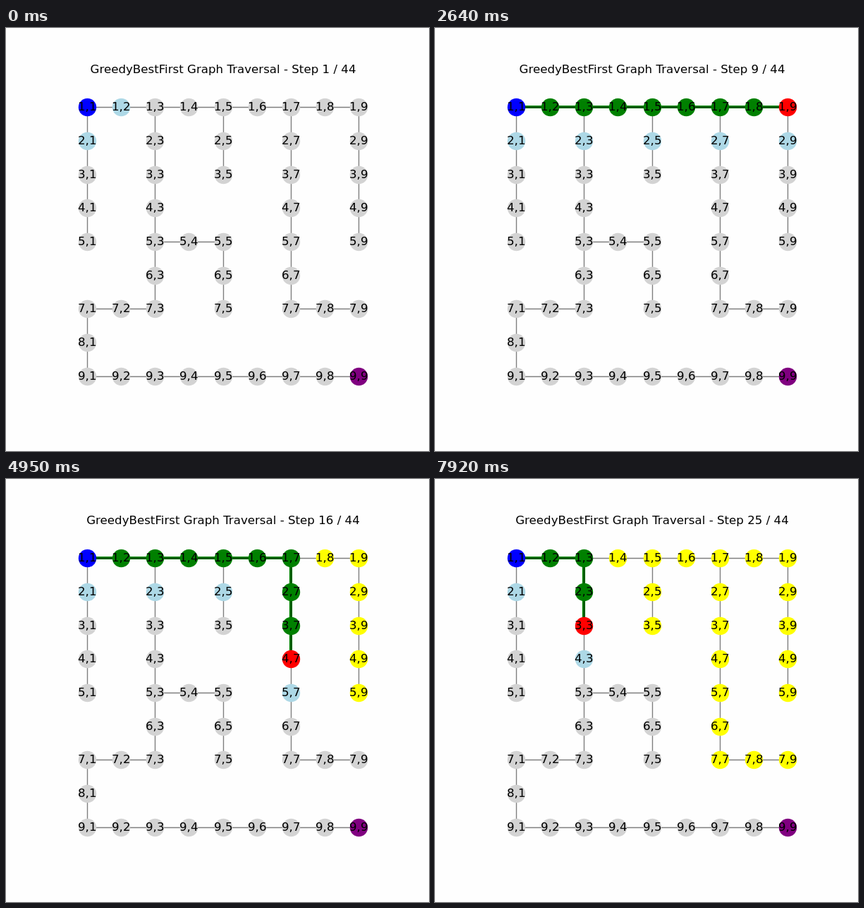
An HTML page for the animation above (8000 ms loop, 600 by 600 pixels).

```html
<!DOCTYPE html>
<html lang="en">
<head>
<meta charset="utf-8">
<title>Graph Traversal</title>
<style>
  html, body { margin: 0; width: 100%; height: 100%; overflow: hidden; background: #fefefe; }
  svg { display: block; width: 600px; height: 600px; }
  text { font: 16.667px "DejaVu Sans", sans-serif; fill: #000; }
  .edge { stroke: #000; stroke-opacity: .5; stroke-width: 1.39; }
  .trail { stroke: green; stroke-width: 4.17; visibility: hidden; }
  #title { text-anchor: middle; }
</style>
</head>
<body>
<svg viewBox="0 0 600 600">
  <g id="trails"></g>
  <g id="edges"></g>
  <g id="nodes"></g>
  <g id="labels"></g>
  <text id="title" x="308" y="64"></text>
</svg>
<script>
const STEP_MS = 330, LOOP_MS = 8000, TOTAL_STEPS = 44;
const START = '1,1', GOAL = '9,9';
// Corridors of the maze as "row column" pairs, each starting at a known cell
const CORRIDORS = ['11-19', '11-51', '13-73', '15-35', '17-77', '19-59',
  '53-55', '55-75', '73-71', '71-91', '77-79', '91-99'];

// Cell centres snap to whole pixels
const px = col => Math.round(307.5 + (col - 5) * 48.037);
const py = row => Math.round(303 + (row - 5) * 47.727);

function add(parent, tag, attrs, text = '') {
  const el = document.createElementNS('http://www.w3.org/2000/svg', tag);
  for (const key in attrs) el.setAttribute(key, attrs[key]);
  el.textContent = text;
  return document.getElementById(parent).appendChild(el);
}

const cells = {};

function addCell(row, col, parent) {
  const id = row + ',' + col, x = px(col), y = py(row);
  if (cells[id]) return id;
  const cell = cells[id] = { row, col, parent, children: [] };
  if (parent) {
    const from = cells[parent];
    from.children.push(id);
    const line = (layer, offset) => add(layer, 'line', {
      class: layer.slice(0, -1),
      x1: px(from.col) + offset, y1: py(from.row) + offset,
      x2: x + offset, y2: y + offset
    });
    line('edges', .5);
    cell.trail = line('trails', 0);
  }
  cell.dot = add('nodes', 'circle', { cx: x + .5, cy: y + .5, r: 12.7 });
  add('labels', 'text', { x: x - 13, y: y + 5 }, id);
  return id;
}

for (const corridor of CORRIDORS) {
  let [row, col, , endRow, endCol] = [...corridor].map(Number);
  let last = addCell(row, col, null);
  while (row !== endRow || col !== endCol) {
    row += Math.sign(endRow - row);
    col += Math.sign(endCol - col);
    last = addCell(row, col, last);
  }
}

// Greedy best-first order: nearest to the goal, ties to the upper cell
function search() {
  const rank = id => (18 - cells[id].row - cells[id].col) * 10 + cells[id].row;
  const order = [], open = [START];
  while (open.length) {
    open.sort((a, b) => rank(a) - rank(b));
    const id = open.shift();
    order.push(id);
    open.push(...cells[id].children);
  }
  return order;
}

const order = search();
const title = document.getElementById('title');
let shown = -1;

function show(step) {
  const current = order[step];
  const visited = new Set(order.slice(0, step + 1));
  const path = new Set();
  for (let id = current; id; id = cells[id].parent) path.add(id);

  const color = id =>
    id === START ? 'blue' :
    id === GOAL ? 'purple' :
    id === current ? 'red' :
    path.has(id) ? 'green' :
    visited.has(id) ? 'yellow' :
    visited.has(cells[id].parent) ? 'lightblue' : 'lightgray';

  for (const id in cells) {
    const { dot, trail } = cells[id];
    dot.setAttribute('fill', color(id));
    if (trail) trail.style.visibility = path.has(id) ? 'visible' : 'hidden';
  }
  title.textContent = `GreedyBestFirst Graph Traversal - Step ${step + 1} / ${TOTAL_STEPS}`;
}

function tick() {
  const step = Math.floor(performance.now() % LOOP_MS / STEP_MS);
  if (step !== shown) show(shown = step);
  requestAnimationFrame(tick);
}
tick();
</script>
</body>
</html>
```
